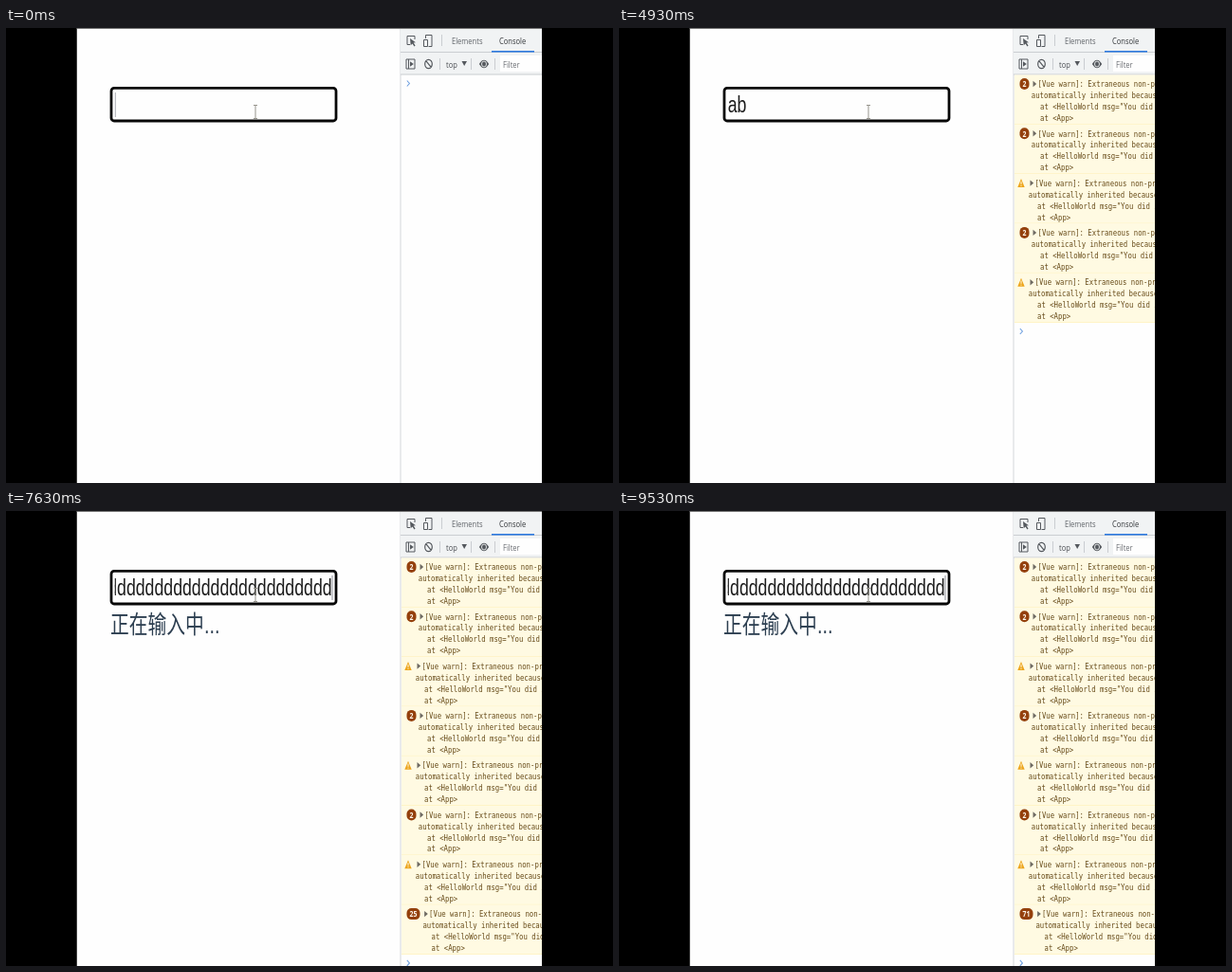
An HTML page with a canvas for the animation above (9.59 s loop, 640 px wide and 480 px high).

```html
<!DOCTYPE html>
<html lang="zh">
<head>
<meta charset="utf-8">
<title>Typing indicator</title>
<style>
html, body { margin: 0; width: 100%; height: 100%; overflow: hidden; background: #000; }
canvas { display: block; }
</style>
</head>
<body>
<canvas id="stage" width="640" height="480"></canvas>
<script>
const ctx = document.getElementById('stage').getContext('2d');
const LOOP = 9590, ROW = 52.3, SQUEEZE = 0.77;
const BLINK = 530, HOLD = 6950, REPEAT = 30.4, LAST = 71;
const SANS = '"Liberation Sans", Arial, sans-serif';
const UI = '"Open Sans", "Noto Sans", sans-serif';
const MONO = '"DejaVu Sans Mono", monospace';
const CJK = '"Liberation Sans", "Noto Sans CJK SC", "Noto Sans CJK", sans-serif';
const PAGE = '#fefefe', BAR = '#f1f3f4', LINE = '#cacdd1';

// time, key pressed, field text, typing shown, console rows ("!" = single warning)
const steps = [
  [-890, 1, '', 0, ''],
  [1230, 1, 's', 1, '2'],
  [2170, 1, '', 1, '2!'],
  [2500, 1, 'a', 1, '22'],
  [3500, 0, 'a', 0, '22!'],
  [3800, 1, 'ab', 1, '22!2'],
  [4800, 0, 'ab', 0, '22!2!'],
  [5100, 1, 'abc', 1, '22!2!2'],
  [6100, 0, 'abc', 0, '22!2!2!'],
  [6430, 1, 'abcd', 1, '22!2!2!2'],
  [HOLD, 1, 'abcdd', 1, '22!2!2!3']
];

function rect(x, y, w, h, color) {
  ctx.fillStyle = color;
  ctx.fillRect(x, y, w, h);
}

function path(d, color, width) {
  const p = new Path2D(d);
  if (width) {
    ctx.strokeStyle = color;
    ctx.lineWidth = width;
    ctx.stroke(p);
  } else {
    ctx.fillStyle = color;
    ctx.fill(p);
  }
}

// The whole page is shown narrowed, so all text shares one horizontal scale.
function text(str, x, y, font, color, align = 'left') {
  ctx.save();
  ctx.translate(x, y);
  ctx.scale(SQUEEZE, 1);
  ctx.font = font;
  ctx.fillStyle = color;
  ctx.textAlign = align;
  ctx.fillText(str, 0, 0);
  ctx.restore();
}

function textWidth(str, font) {
  ctx.font = font;
  return ctx.measureText(str).width * SQUEEZE;
}

function drawToolbar() {
  const ink = '#55595e';
  rect(416, 1, 149, 48, BAR);
  rect(416, 25, 149, 1, LINE);
  rect(416, 48.5, 149, 1, LINE);
  rect(459, 7, 1, 12, LINE);
  rect(457, 32, 1, 12, LINE);
  rect(490, 32, 1, 12, LINE);
  rect(515, 32, 1, 12, LINE);
  rect(521, 29, 44, 17, PAGE);
  rect(512, 24, 45, 1.6, '#2f7be0');

  path('M431 12V8.5H423V17.5H426', ink, 1);
  path('M426 11L432 15.2L429.6 15.6L431.6 18.6L430.4 19.4L428.6 16.5L426.7 18.2Z', ink);
  path('M442.5 11V7.5H449V19.5H445.5M440.5 12.5H444.5V19.5H440.5Z', ink, 1);
  path('M422 33H431V43H422ZM424.5 33V43', ink, 1);
  path('M426 35.2L429.8 38L426 40.8Z', ink);
  path('M449.3 38A3.8 4.7 0 1 1 441.7 38A3.8 4.7 0 1 1 449.3 38M442.8 34.7L448.2 41.3', ink, 1.2);
  path('M480.5 35H486L483.2 40Z', ink);
  path('M498.8 38Q504 29.5 509.2 38Q504 46.5 498.8 38Z', ink);
  path('M506.5 38A2.5 3 0 1 1 501.5 38A2.5 3 0 1 1 506.5 38', BAR, 0.9);

  const font = '9.8px ' + UI;
  text('Elements', 470, 16.8, font, '#5f6368');
  text('Console', 520, 16.8, font, '#333639');
  text('top', 464, 41.5, font, '#4a4d52');
  text('Filter', 524, 41.5, font, '#6a6d72');
}

function drawRow(i, count) {
  const top = 49.5 + i * ROW, y = top + 9.5;
  const font = '9.5px ' + MONO;
  rect(417, top, 148, ROW, '#fffae2');
  rect(417, top + ROW - 0.8, 148, 0.8, '#fff3c0');
  const dx = count < 2 ? -3 : count < 10 ? 0 : 4.6;
  if (count < 2) {
    path(`M424 ${y - 4.5}L427.7 ${y + 4.5}H420.3Z`, '#eda51c');
    rect(423.5, y - 1.8, 1, 3.4, '#fff8e0');
    rect(423.5, y + 2.4, 1, 1, '#fff8e0');
  } else {
    ctx.fillStyle = '#94400c';
    ctx.beginPath();
    ctx.roundRect(422.5, y - 6, count < 10 ? 10 : 14, 12, 5);
    ctx.fill();
    text(count, count < 10 ? 427.5 : 429.5, y + 3.2, 'bold 9px ' + UI, '#fff8ee', 'center');
  }
  path(`M${436.5 + dx} ${y - 3.2}L${440.2 + dx} ${y}L${436.5 + dx} ${y + 3.2}Z`, '#6e6a62');
  [
    [441.5, '[Vue warn]: Extraneous non-props'],
    [434.8, 'automatically inherited because'],
    [444, 'at <HelloWorld msg="You did it!"'],
    [444, 'at <App>']
  ].forEach(([x, line], n) => text(line, x + dx, y + 3.2 + n * 11.9, font, '#664a18'));
}

function drawField(value, caretOn) {
  ctx.strokeStyle = '#080808';
  ctx.lineWidth = 2.8;
  ctx.beginPath();
  ctx.roundRect(111, 63.4, 237, 34.6, 3);
  ctx.stroke();

  const font = '23px ' + SANS, width = textWidth(value, font);
  const end = Math.min(114.7 + width, 343.6);
  ctx.save();
  ctx.beginPath();
  ctx.rect(114.6, 65, 230.4, 31);
  ctx.clip();
  text(value, end - width, 88.6, font, '#1c1c1c');
  if (caretOn) rect(end - 0.1, 68, 1, 26, '#8f929a');
  ctx.restore();

  path('M261 81.5H265M263 82V95M261 95.5H265', '#96948c', 1);
}

function draw(t) {
  let now, key;
  for (const s of steps) {
    if (s[0] > t) break;
    now = s;
    if (s[1]) key = s[0];
  }
  let [, , value, typing, rows] = now;
  const counts = [...rows].map(c => c === '!' ? 1 : +c);

  if (t >= HOLD) {
    // The held key repeats until it is let go.
    const n = Math.min(LAST, 3 + Math.floor((t - HOLD) / REPEAT));
    counts[counts.length - 1] = n;
    value = 'abc' + 'd'.repeat(n - 1);
    key = HOLD + (n - 3) * REPEAT;
  }

  // The first blink after a key press is skipped.
  const beat = Math.floor((t - key) / BLINK);
  const caretOn = beat < 2 || beat % 2 === 1;

  rect(0, 0, 640, 480, '#000');
  ctx.save();
  ctx.beginPath();
  ctx.rect(74.5, 0, 490.5, 480);
  ctx.clip();
  rect(74.5, 0, 491, 480, PAGE);
  rect(74.5, 0, 491, 1, '#777');
  drawField(value, caretOn);
  if (typing) text('正在输入中...', 110, 129.3, '25.7px ' + CJK, '#2c3e50');
  rect(415.5, 1, 1, 479, '#d4d6da');
  drawToolbar();
  counts.forEach((n, i) => drawRow(i, n));
  const y = 58.5 + counts.length * ROW;
  path(`M422.8 ${y - 3}L425.4 ${y}L422.8 ${y + 3}`, '#6fa0e0', 1.1);
  ctx.restore();
}

const start = performance.now();
function tick() {
  draw((performance.now() - start) % LOOP);
  requestAnimationFrame(tick);
}
tick();
</script>
</body>
</html>
```
